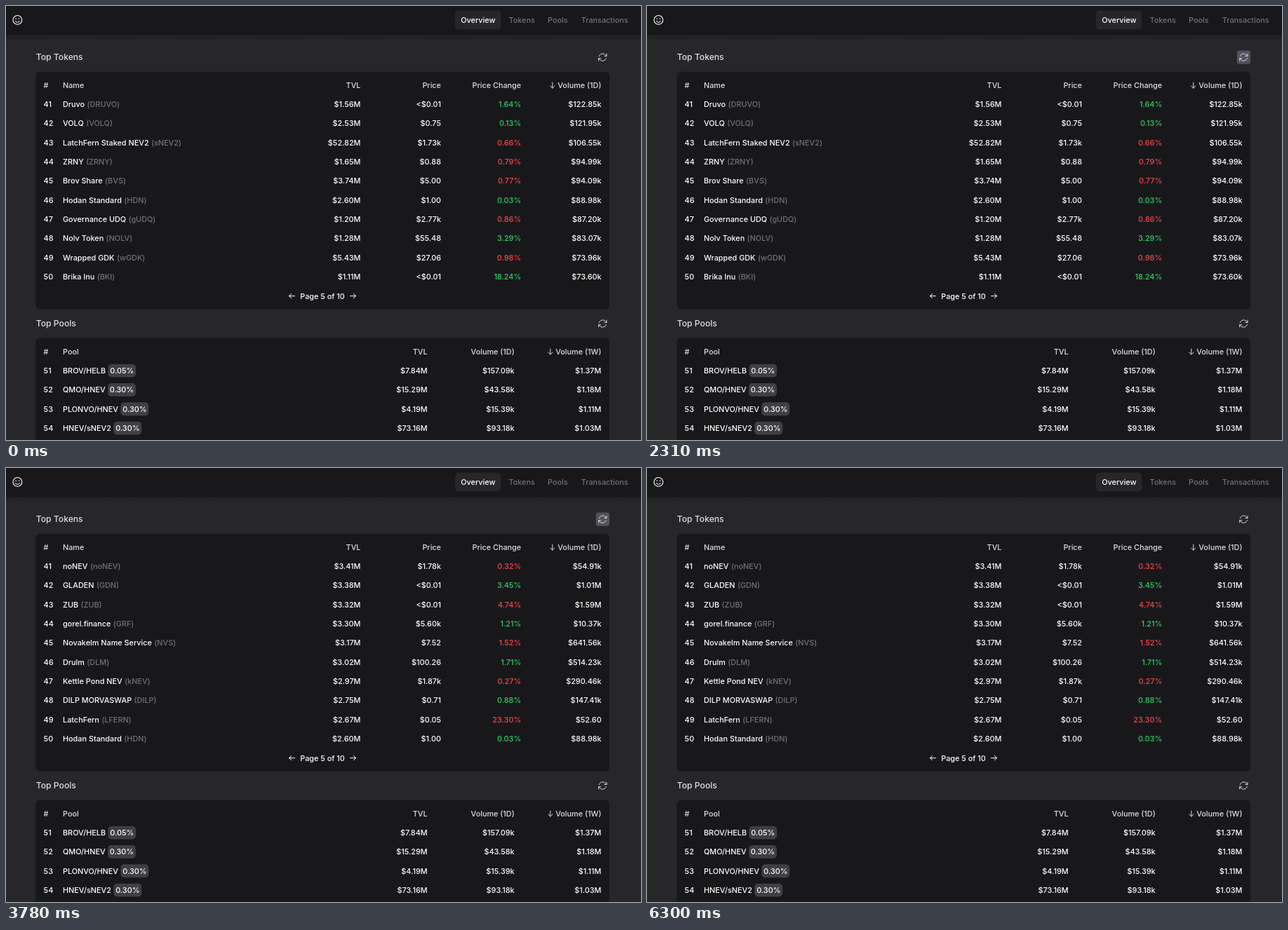
An HTML page for the animation above (6370 ms loop, 905 by 619 pixels).

```html
<!DOCTYPE html>
<html lang="en">
<head>
<meta charset="utf-8">
<title>Token overview</title>
<style>
  html, body { margin: 0; width: 100%; height: 100%; overflow: hidden; background: #27272a; }
  svg { display: block; width: 905px; height: 619px; }
  text { font: 500 10.85px Inter, sans-serif; fill: #fff; white-space: pre; }
  .end { text-anchor: end; }
  .mid { text-anchor: middle; }
  .head { fill: #dedee2; }
  .title { font-size: 12.15px; fill: #dedee2; }
  .dim { fill: #71717a; }
  .up { fill: #30d367; }
  .down { fill: #f9474a; }
  .icon { fill: none; stroke: #dedee2; stroke-width: 1; stroke-linecap: round; stroke-linejoin: round; }
</style>
</head>
<body>
<svg id="stage" viewBox="0 0 905 619">
  <defs>
    <linearGradient id="shade" x2="0" y2="1">
      <stop offset="0" stop-color="#000" stop-opacity=".2"/>
      <stop offset=".5" stop-color="#000" stop-opacity=".07"/>
      <stop offset="1" stop-color="#000" stop-opacity="0"/>
    </linearGradient>
  </defs>
</svg>
<script>
const LOOP = 6370, HOVER_ON = 1960, LOAD = 3150, LOADED = 3780, HOVER_OFF = 4760;
const ROW = 27.33, FIRST = 140.2, BASE = 3.9;
const CARD = '#18181b';
const stage = document.getElementById('stage');

// name | ticker | TVL | price | change (signed) | volume
const byVolume = `Druvo|DRUVO|$1.56M|<$0.01|+1.64%|$122.85k
VOLQ|VOLQ|$2.53M|$0.75|+0.13%|$121.95k
LatchFern Staked NEV2|sNEV2|$52.82M|$1.73k|-0.66%|$106.55k
ZRNY|ZRNY|$1.65M|$0.88|-0.79%|$94.99k
Brov Share|BVS|$3.74M|$5.00|-0.77%|$94.09k
Hodan Standard|HDN|$2.60M|$1.00|+0.03%|$88.98k
Governance UDQ|gUDQ|$1.20M|$2.77k|-0.86%|$87.20k
Nolv Token|NOLV|$1.28M|$55.48|+3.29%|$83.07k
Wrapped GDK|wGDK|$5.43M|$27.06|-0.98%|$73.96k
Brika Inu|BKI|$1.11M|<$0.01|+18.24%|$73.60k`;

const byTvl = `noNEV|noNEV|$3.41M|$1.78k|-0.32%|$54.91k
GLADEN|GDN|$3.38M|<$0.01|+3.45%|$1.01M
ZUB|ZUB|$3.32M|<$0.01|-4.74%|$1.59M
gorel.finance|GRF|$3.30M|$5.60k|+1.21%|$10.37k
Novakelm Name Service|NVS|$3.17M|$7.52|-1.52%|$641.56k
Drulm|DLM|$3.02M|$100.26|+1.71%|$514.23k
Kettle Pond NEV|kNEV|$2.97M|$1.87k|-0.27%|$290.46k
DILP MORVASWAP|DILP|$2.75M|$0.71|+0.88%|$147.41k
LatchFern|LFERN|$2.67M|$0.05|-23.30%|$52.60
Hodan Standard|HDN|$2.60M|$1.00|+0.03%|$88.98k`;

const pools = `BROV/HELB|0.05%|$7.84M|$157.09k|$1.37M
QMO/HNEV|0.30%|$15.29M|$43.58k|$1.18M
PLONVO/HNEV|0.30%|$4.19M|$15.39k|$1.11M
HNEV/sNEV2|0.30%|$73.16M|$93.18k|$1.03M`;

function add(parent, tag, attrs, content) {
  const el = document.createElementNS('http://www.w3.org/2000/svg', tag);
  for (const key in attrs) el.setAttribute(key, attrs[key]);
  if (content !== undefined) el.textContent = content;
  return parent.appendChild(el);
}
const group = parent => add(parent, 'g', {});
const box = (parent, x, y, width, height, rx, fill) =>
  add(parent, 'rect', { x, y, width, height, rx, fill });
// y is the optical middle of the line
const label = (parent, x, y, content, cls = '') =>
  add(parent, 'text', { x, y: y + BASE, class: cls }, content);
const right = (parent, x, y, content, cls = '') => label(parent, x, y, content, 'end ' + cls);

function arrow(parent, x, y, angle, stroke) {
  add(parent, 'path', {
    class: 'icon', style: `stroke:${stroke}`,
    d: 'M-4 0H4M.8-3.2L4 0L.8 3.2',
    transform: `translate(${x} ${y}) rotate(${angle})`
  });
}

function refresh(parent, x, y) {
  add(parent, 'path', {
    class: 'icon', style: 'stroke-width:1.55',
    transform: `translate(${x} ${y}) scale(.63) translate(-12 -12)`,
    d: 'M16 9.35h5V4.35M3 19.65v-5h5M3 14.65l3.2 3.2a8.25 8.25 0 0 0 13.8-3.7M4 9.85a8.25 8.25 0 0 1 13.8-3.7l3.2 3.2'
  });
}

function pager(parent, page, total, gap, color) {
  label(parent, 451, 413.6, `Page ${page} of ${total}`, 'mid');
  arrow(parent, 451 - gap, 413.6, 180, color);
  arrow(parent, 451 + gap, 413.6, 0, color);
}

function tokenRows(data) {
  const g = group(stage);
  data.split('\n').forEach((line, i) => {
    const [name, ticker, tvl, price, change, volume] = line.split('|');
    const y = FIRST + i * ROW;
    label(g, 53.6, y, 41 + i);
    const text = label(g, 81, y, name);
    add(text, 'tspan', { class: 'dim', dx: 3.4 }, `(${ticker})`);
    right(g, 505.5, y, tvl);
    right(g, 620, y, price);
    right(g, 734.2, y, change.slice(1), change[0] === '+' ? 'up' : 'down');
    right(g, 848.7, y, volume);
  });
  pager(g, 5, 10, 43.5, '#fff');
  return g;
}

function skeleton() {
  const g = group(stage);
  for (let i = 0; i < 10; i++) box(g, 53.5, FIRST - 8.2 + i * ROW, 795.5, 16.4, 8.2, '#27272a');
  pager(g, 1, 1, 39, '#52525b');
  return g;
}

function drawNav() {
  box(stage, 0, 41, 905, 11, 0, 'url(#shade)');
  box(stage, 0, 0, 905, 41.3, 0, CARD);
  const face = add(stage, 'g', {
    class: 'icon', style: 'stroke:#fff;stroke-width:1.1', transform: 'translate(16.4 19.9)'
  });
  add(face, 'circle', { r: 6.4 });
  add(face, 'path', { d: 'M-2.9 1.6Q0 5.2 2.9 1.6' });
  add(face, 'path', { d: 'M-2.2-1.6h.01M2.2-1.6h.01', style: 'stroke-width:1.6' });
  box(stage, 640, 6.4, 65.3, 27.2, 5.5, '#27272a');
  label(stage, 648.2, 20, 'Overview');
  label(stage, 716.5, 20, 'Tokens', 'dim');
  label(stage, 772, 20, 'Pools', 'dim');
  label(stage, 819.8, 20, 'Transactions', 'dim');
}

function drawTokens() {
  label(stage, 42.8, 73.3, 'Top Tokens', 'title');
  const glow = box(stage, 840.8, 63.5, 19.2, 19.2, 3.5, '#52525b');
  refresh(stage, 850.3, 73.1);
  box(stage, 42.4, 93.8, 817.6, 338.7, 5.5, CARD);
  label(stage, 53.6, 113, '#', 'head');
  label(stage, 81, 113, 'Name', 'head');
  right(stage, 505.5, 113, 'TVL', 'head');
  right(stage, 620, 113, 'Price', 'head');
  right(stage, 734.2, 113, 'Price Change', 'head');
  right(stage, 848.4, 113, 'Volume (1D)', 'head');
  arrow(stage, 778.7, 113.2, 90, '#dedee2');
  return glow;
}

function drawPools() {
  label(stage, 42.8, 453.2, 'Top Pools', 'title');
  refresh(stage, 850.3, 453);
  box(stage, 42.4, 473.6, 817.6, 160, 5.5, CARD);
  label(stage, 53.6, 492.8, '#', 'head');
  label(stage, 81, 492.8, 'Pool', 'head');
  right(stage, 600.7, 492.8, 'TVL', 'head');
  right(stage, 724.7, 492.8, 'Volume (1D)', 'head');
  right(stage, 848.4, 492.8, 'Volume (1W)', 'head');
  arrow(stage, 775.8, 493, 90, '#dedee2');
  pools.split('\n').forEach((line, i) => {
    const [pair, fee, tvl, day, week] = line.split('|');
    const y = 520.1 + i * ROW;
    label(stage, 53.6, y, 51 + i);
    const left = 81 + label(stage, 81, y, pair).getComputedTextLength() + 3.4;
    const badge = box(stage, left, y - 9.4, 0, 18.8, 5, '#3f3f46');
    const text = label(stage, left + 2.8, y, fee);
    badge.setAttribute('width', text.getComputedTextLength() + 5.6);
    right(stage, 600.7, y, tvl);
    right(stage, 724.7, y, day);
    right(stage, 848.4, y, week);
  });
}

drawNav();
const glow = drawTokens();
const before = tokenRows(byVolume), loading = skeleton(), after = tokenRows(byTvl);
drawPools();

const show = (el, on) => el.setAttribute('visibility', on ? 'visible' : 'hidden');

function render(t) {
  show(glow, t >= HOVER_ON && t < HOVER_OFF);
  show(before, t < LOAD);
  show(loading, t >= LOAD && t < LOADED);
  show(after, t >= LOADED);
}

const start = performance.now();
function tick() {
  render((performance.now() - start) % LOOP);
  requestAnimationFrame(tick);
}
tick();
</script>
</body>
</html>
```
